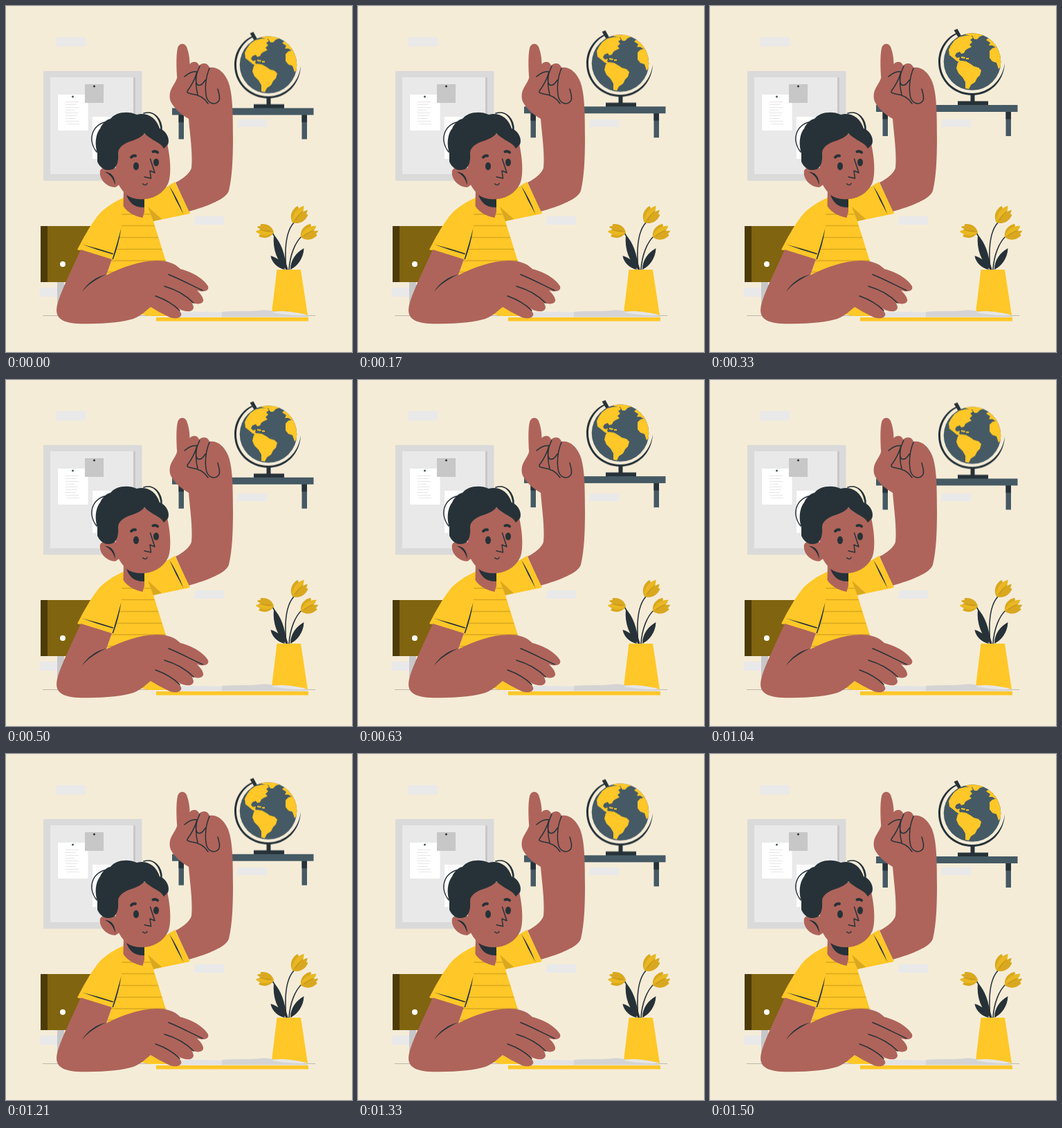
Write an HTML page that moves like this. It is 500 px wide and 500 px high and loops after 1.54 s.

```html
<!DOCTYPE html>
<html lang="en">
<head>
<meta charset="utf-8">
<title>Raised hand</title>
<style>
html, body { margin: 0; width: 100%; height: 100%; overflow: hidden; background: #f5ecd8; }
svg { display: block; width: 100vw; height: 100vh; }
.ink { fill: #263238; }
.slate { fill: #455a64; }
.sun { fill: #ffc727; }
.gold { fill: #d9a820; }
.skin { fill: #ae645a; }
.line { fill: none; stroke: #263238; stroke-width: 1.5; stroke-linecap: round; stroke-linejoin: round; }
</style>
</head>
<body>
<svg viewBox="0 0 500 500">
  <defs>
    <clipPath id="sea"><circle cx="379" cy="85.500" r="41.300"/></clipPath>
    <clipPath id="torso"><path d="M168 285L205 291L212 310L232 372L240 448L145 390L167 318Z"/></clipPath>
    <g id="flower">
      <path class="gold" d="M0 0C4-10 14-13 23-10C23-4 12 1 0 0Z"/>
      <path class="gold" d="M0 0C4 10 14 13 23 10C23 4 12-1 0 0Z"/>
      <path fill="#e9b722" d="M0 0C7-8 20-9 29-3C25 2 12 5 0 0Z"/>
      <path class="gold" d="M0 0C9-3 21 0 28 5C20 10 7 8 0 0Z"/>
      <path d="M5 1Q14-1 23 1" fill="none" stroke="#b98b13" stroke-width=".8"/>
    </g>
  </defs>

  <g fill="#e9e9e9">
    <path d="M72.500 45H115.500V58.500H71.500V53Z"/>
    <path d="M335 164H377V175H334Z"/>
    <path d="M273 304H315V316H272Z"/>
    <path d="M49 407H74V420H48Z"/>
  </g>

  <g>
    <path fill="#dadada" d="M54 94H196.500V252.500H54Z"/>
    <path fill="#e9e9e9" d="M64 103H187V243H64Z"/>
    <path fill="#c7c7c7" d="M184 103H187V243H184Z"/>
    <path fill="#fff" d="M75 128H118.500V180H75ZM125 160H165V221H125Z"/>
    <path fill="#c7c7c7" d="M114 113H141V140H114Z"/>
    <path d="M86 138.500H105M86 142.500H102M86 146.500H105M86 150.500H99M86 154.500H104M86 158.500H103M86 162.500H101M86 166.500H105M88 170.500H106" stroke="#e6e6e6"/>
    <circle cx="96.500" cy="131" r="1.500" fill="#455a64"/>
    <circle cx="127.500" cy="116" r="1.500" class="ink"/>
  </g>

  <g id="shelf">
    <path class="slate" d="M249.500 157H257V193H249.500ZM427.500 157H435V193H427.500Z"/>
    <path class="ink" d="M249.500 157H257V168.500H249.500ZM427.500 157H435V168.500H427.500Z"/>
    <path class="slate" d="M240 148H444.500V158H240Z"/>
    <path class="ink" d="M358 142.500H402V148H358ZM376.500 131H382.500V143H376.500Z"/>
    <path class="ink" d="M352.500 40L357.500 38L364 50L360 52.500Z"/>
    <path class="ink" d="M358 43C341 50 330 66 330 86C330 113 352 134 379 134C405 134 425 114 426 87C423 112 403 131 379 131C353 131 333 111 333 86C333 68 343 52 358 45Z"/>
    <circle cx="379" cy="85.500" r="41.300" class="slate"/>
    <g class="sun" clip-path="url(#sea)">
      <path d="M345 68L348 62L353 55L360 50L368 48L377 47L380 51L376 54L379 57L375 61L378 64L372 67L369 69L367 73L363 74L361 71L356 73L354 77L357 80L361 79L360 83L366 87L363 88L356 84L350 79L346 76Z"/>
      <path d="M367 46L376 43L389 44L396 47L390 49L386 53L382 53L379 48Z"/>
      <path d="M358 87L363 84L370 85L377 89L381 92L388 94L392 98L390 105L386 109L383 115L377 119L374 125L369 124L369 115L365 108L359 102L356 95Z"/>
      <path d="M399 54L404 50L411 53L417 62L413 65L408 62L403 62L405 58Z"/>
      <path d="M404 70L408 66L416 64L421 72L421 92L417 96L414 87L408 85L404 80Z"/>
      <path d="M363 78L369 79L368 81L363 80ZM370 80H374V82H370Z"/>
    </g>
  </g>

  <path d="M53 447.500H447" stroke="#263238" stroke-width=".5" opacity=".55"/>

  <path fill="#c7c7c7" d="M74 398H84V430H74Z"/>
  <path fill="#80640f" d="M50 318H140V399H50Z"/>
  <path fill="#4d3c08" d="M50 318H60V399H50Z"/>
  <circle cx="82" cy="373" r="4" fill="#fff"/>

  <path class="line" style="stroke-width:1.600" d="M405 382C402 350 405 325 416 313M409 382C410 360 418 341 428 332M407 382C402 364 397 346 385 328"/>
  <path class="ink" d="M405 381C392 369 385 352 387 331C397 341 404 358 405 381ZM411 381C411 366 420 356 430.500 350C430 365 421 376 411 381ZM403 381C393 379 384 371 382.500 361C393 364 401 371 403 381Z"/>
  <use href="#flower" transform="translate(414 313) rotate(-50)"/>
  <use href="#flower" transform="translate(426 334) rotate(-30) scale(.95)"/>
  <use href="#flower" transform="translate(387 327) rotate(188) scale(.9)"/>
  <path class="sun" d="M391.500 381H426L436 447H383.500Z"/>

  <g>
    <path fill="#e3e3e3" d="M240 443Q280 441 313 443V449.500H240Z"/>
    <path fill="#d4d4d4" d="M312 442C330 440 350 442 366 440C378 437 390 444 414 444L436 447V449.500H312Z"/>
    <path fill="#e6e6e6" d="M384 443C395 439 414 442 435 446L428 447C410 447 396 445 384 443Z"/>
    <path class="sun" d="M217 450H437V455.500H217Z"/>
  </g>

  <g>
    <path class="skin" d="M247 101C246 85 246 70 248 61C250 53 258 53 261 59C264 67 265.500 75 265.500 84C270 79 277 80 279 86C284 81 292 82 294 89C305 87 315 95 321 109C327 125 328 148 328 190C328 220 327 246 322 267C318 279 292 289 264 297L245 255C256 250 266 241 268 234C270 212 266 188 264 163C253 157 243 148 238 138C235 130 237 122 241 116C246 108 248 104 247 101Z"/>
    <path class="line" d="M258 102C264 97 270 94 276 95C273 107 268 115 262 123C261 126 264 126 268 127C278 128 286 132 292 141M276 95C274 106 274 117 277 128M280 87C274 100 273 110 277 114C281 116 285 112 288 107M294 90C288 104 287 121 290 133C294 142 302 143 307 138C310 134 308 127 306 120"/>
  </g>

  <path class="sun" d="M170 277C154 284 139 294 132 304C121 318 112 335 103 352L153 366L145 390L170 440L207 448H240L232 372L213 311L266 300L244 254C228 264 214 272 198 277V303Z"/>
  <path class="gold" d="M205 290L225 308L213 311Z"/>
  <path clip-path="url(#torso)" d="M160 301H240M160 317.500H240M160 334.500H240M160 351.500H240M145 368H240M145 384.500H240" stroke="#d9a820" stroke-width="1.300"/>
  <path class="ink" d="M236 260Q248 278 256.500 301Q245 281 236 260ZM166.500 321Q163 345 155 366L153.500 366Q160 345 166.500 321ZM110 344.500Q132 350 155 357.500L154.500 359Q131 352.500 110 344.500Z"/>

  <path class="skin" d="M170 264L200 276V297L197.500 306C186 304 175 298 169.500 289Z"/>
  <path class="ink" d="M174 273C183 279 191 280 200 278V291C189 292 179 287 174 273Z"/>

  <g>
    <path class="skin" d="M158 215C165 188 202 174 232 195C237 215 240 243 234 257C226 274 207 281 191 279C173 276 162 264 159 244Z"/>
    <path class="skin" d="M162 238C155 228 140 231 136 238C134 250 145 262 158 262L164 258Z"/>
    <path class="ink" d="M143 240C153 240 158 248 158 259C155 249 151 244 143 240Z"/>
    <path class="ink" d="M132 213C128 200 129 186 136 177C140 168 146 164 151 163C158 153 177 151 189 157C202 153 217 160 222 177C233 181 237 193 234 200L228 206C224 197 211 195 200 184C195 191 184 194 176 197C167 201 162 206 162 213C163 225 160 233 154 236C146 239 137 236 132 225Z"/>
    <path class="line" d="M149 167C126 168 116 192 131 211M199 155C214 150 226 164 225 180M207 154C217 155 223 166 224 178"/>
    <path class="line" style="stroke-width:4" d="M181 218.500Q183.500 215.500 187 216.500M212.500 210.500Q216 209 219 211.500"/>
    <ellipse class="ink" cx="188" cy="231.500" rx="4" ry="5.800"/>
    <ellipse class="ink" cx="217" cy="226" rx="4" ry="5.500"/>
    <path class="line" d="M208.500 221L215 241L208 238L209.500 249L200 247M197.500 257Q202 260.500 204 256.500"/>
  </g>

  <path class="skin" d="M108 352C97 377 80 410 74 432C70 450 79 457 103 459C140 460 168 457 184 452C197 447 203 439 209 435C216 439 226 445 237 450C246 453 255 450 253 444L249 437C261 444 271 442 271 435L269 429C279 432 286 430 285 424C284 419 280 415 276 411C286 414 294 412 292 405C287 396 272 385 252 380C243 371 232 368 218 368C193 368 167 378 145 389L153 366Z"/>
  <path class="ink" d="M145 388C130 391 117 401 110 413C119 402 131 394 145 388Z"/>
  <path class="line" d="M235 388C250 394 265 402 284 411M229 405C243 409 258 416 271 429M216 419C230 424 242 431 251 440"/>
</svg>
<script>
const lift = (y, offset) => ({ transform: `translateY(${y}px)`, offset, easing: 'steps(18, end)' });
const loop = 1540, trip = 1500;

// 24 steps a second: ten units up, ten down. The loop opens on the first step.
document.getElementById('shelf').animate(
  [lift(0, 0), lift(-10, trip / 2 / loop), lift(0, trip / loop), lift(0, 1)],
  { duration: loop, iterations: Infinity, delay: -47 }
);
</script>
</body>
</html>
```
